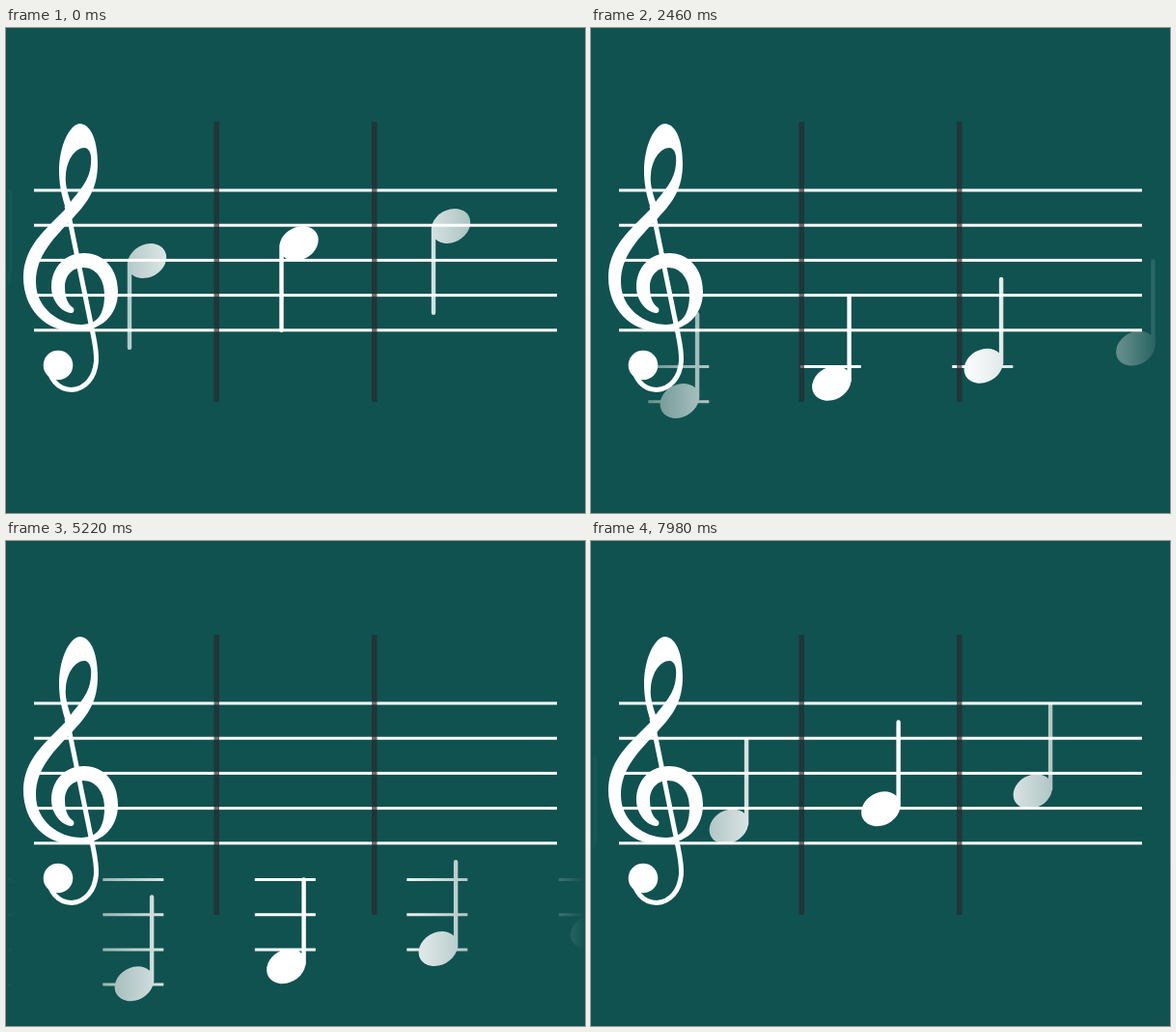
An HTML page with a canvas that plays this animation: 600 px wide and 502 px high, repeating every 8000 ms.

```html
<!DOCTYPE html>
<html lang="en">
<head>
<meta charset="utf-8">
<title>Scrolling scale</title>
<style>
html, body { margin: 0; width: 100%; height: 100%; overflow: hidden; background: #105250; }
canvas { display: block; }
</style>
</head>
<body>
<canvas id="stage" width="600" height="502"></canvas>
<script>
const ctx = document.getElementById('stage').getContext('2d');

const LOOP = 8000, TICK = 60;
const CENTER = 300.5, GAP = 157.5;      // slot in focus, distance between notes
const TOP_Y = 223, STEP = 18.1;         // step 0 is C5, higher steps sound lower
const LAST = 14, TURN = 13;

// Notes fade towards both edges of the stage
const fade = ctx.createLinearGradient(0, 0, 600, 0);
[[0, 0], [45, .3], [110, .62], [165, .85], [215, 1]].forEach(([x, a]) => {
  const color = `rgba(255,255,255,${a})`;
  fade.addColorStop(x / 600, color);
  fade.addColorStop(1 - x / 600, color);
});

const clefBody = new Path2D(`
  M77 99 C89 100 95 119 95 140 C95 165 86 179 70 196
  C50 217 31 235 31 263 C31 290 55 307 78 307
  C97 307 102 293 102 276 C102 261 94 248 80 248
  C67 248 61 258 61 268 C61 279 64 286 70 290
  C71 293 70 295 67 295 C55 293 47 280 47 268
  C47 249 60 233 81 233 C102 233 116 250 116 273
  C116 298 98 314 71 314 C40 314 18 290 18 258
  C18 233 33 216 47 202 C52 197 57 192 62 187
  C57 172 55 160 55 148 C55 122 66 99 77 99 Z
  M81 124 C87 124 89 132 88 140 C87 158 76 168 67 180
  C63 168 61 160 62 152 C63 136 72 124 81 124 Z`);
const clefTail = new Path2D(
  'M63 184 L90 316 Q94 335 93.5 345 C92 362 82 374 68 374.5 C53 374 45 362 44 350');

// Distance covered: speeds up over ramp, cruises, slows down over ramp
function travel(t, speed, ramp, dist) {
  const total = dist / speed + ramp;
  if (t <= 0) return 0;
  if (t >= total) return dist;
  if (t < ramp) return speed * t * t / (2 * ramp);
  if (t > total - ramp) return dist - speed * (total - t) ** 2 / (2 * ramp);
  return speed * (t - ramp / 2);
}

// Scale step standing in the focus slot at a time in seconds
function focusAt(s) {
  return travel(s, 3.381, .38, TURN) - travel(s - 4.404, 3.262, 1.02, TURN);
}

function drawNote(k, x) {
  const y = TOP_Y + STEP * k;
  const down = k <= 1;
  const headX = down ? x + 3 : x;
  const stemX = down ? x - 15 : x + 18.3;
  ctx.beginPath();
  ctx.ellipse(headX, y, 21.2, 16.8, -.52, 0, Math.PI * 2);
  ctx.closePath();
  ctx.roundRect(stemX - 2.2, down ? y : y - 92, 4.4, 92, 2.2);
  const ledgers = Math.floor((k - 5) / 2);
  for (let i = 0; i < ledgers; i++) {
    ctx.rect(x - 32.5, 349 + i * 36.2, 63, 3);
  }
  ctx.fillStyle = fade;
  ctx.fill();
}

function drawClef() {
  ctx.fillStyle = ctx.strokeStyle = '#fff';
  ctx.fill(clefBody, 'evenodd');
  ctx.lineWidth = 5;
  ctx.stroke(clefTail);
  ctx.beginPath();
  ctx.arc(54, 349, 15.3, 0, Math.PI * 2);
  ctx.fill();
}

function draw(ms) {
  ctx.fillStyle = '#105250';
  ctx.fillRect(0, 0, 600, 502);

  ctx.fillStyle = '#fff';
  for (let i = 0; i < 5; i++) ctx.fillRect(29, 166.5 + i * 36.2, 542, 3);

  const focus = focusAt(ms / 1000);
  const mid = Math.round(focus);
  for (let k = mid - 3; k <= Math.min(mid + 3, LAST); k++) {
    drawNote(k, CENTER + (focus - k) * GAP);
  }

  drawClef();

  ctx.fillStyle = 'rgba(41,41,45,.68)';
  ctx.fillRect(215.5, 97, 5.5, 290);
  ctx.fillRect(379, 97, 5.5, 290);
}

function frame() {
  const ms = performance.now() % LOOP;
  draw(Math.floor(ms / TICK) * TICK);
  requestAnimationFrame(frame);
}
frame();
</script>
</body>
</html>
```
